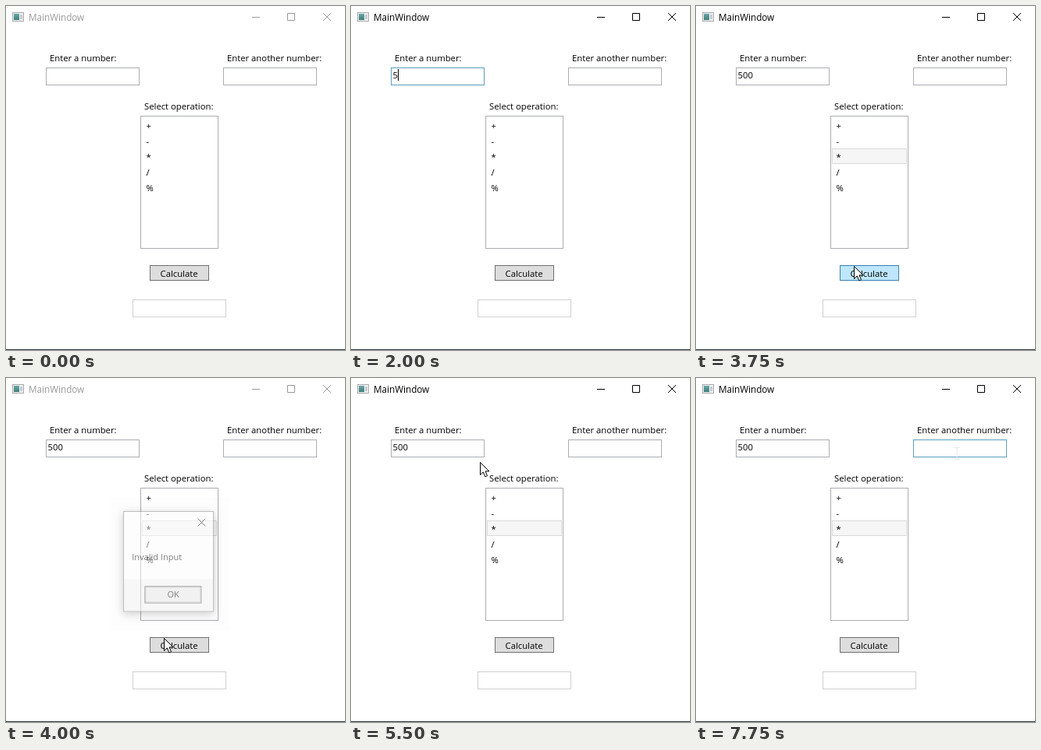
These frames come from a looping animation (434 by 442 pixels, 8000 ms). An HTML page:

```html
<!DOCTYPE html>
<html lang="en">
<head>
<meta charset="utf-8">
<title>Calculator window</title>
<style>
  html, body { margin: 0; width: 100%; height: 100%; overflow: hidden; background: #fff; }
  svg { display: block; width: 434px; height: 442px; }
  text { font: 11.3px "Open Sans", "Noto Sans", sans-serif; fill: #000; white-space: pre; }
  #title { font-size: 11.7px; }
  rect { fill: #fff; stroke: #abadb3; }
  .glyph { fill: none; }
  #caption { stroke: #999; }
  #caption text { fill: #999; stroke: none; }
  #caption.active { stroke: #000; }
  #caption.active text { fill: #000; }
  .hover { stroke: #86b6cc; }
  .focus { stroke: #5b9dbd; }
  #result { stroke: #d0d0d0; }
  #item { fill: none; stroke: none; }
  #item.hover { fill: #e4f4fb; stroke: #70c0e7; }
  #item.chosen { fill: #cbe8f6; stroke: #26a0da; }
  #item.idle { fill: #f6f6f6; stroke: #dadada; }
  #button { fill: #ddd; stroke: #707070; }
  #button.hover { fill: #bee6fd; stroke: #3c7fb1; }
  #halo { fill: #000; fill-opacity: .018; stroke: none; }
  #panel { fill: #fcfcfc; stroke: #777; filter: drop-shadow(0 3px 6px rgba(0, 0, 0, .38)); }
  #footer { fill: #f0f0f0; stroke: none; }
  #caret { stroke: #000; }
</style>
</head>
<body>
<svg viewBox="0 0 434 442">
  <defs>
    <linearGradient id="teal" x2="0" y2="1">
      <stop stop-color="#6aa6a8"/><stop offset="1" stop-color="#3e7f78"/>
    </linearGradient>
  </defs>

  <g id="caption">
    <rect x="8.5" y="8.5" width="14" height="11" style="fill:#f2f2f2;stroke:#a5a9ab"/>
    <rect x="10" y="10" width="7" height="8" style="fill:url(#teal);stroke:none"/>
    <rect x="18" y="11" width="3" height="6" style="fill:#c5cdd0;stroke:none"/>
    <text id="title" x="29" y="19">MainWindow</text>
    <path class="glyph" d="M315 14.5h10M360.5 9.5h9v9h-9zM406 9l10 10M416 9l-10 10"/>
  </g>

  <text x="56" y="71">Enter a number:</text>
  <text x="283" y="71">Enter another number:</text>
  <text x="177" y="133">Select operation:</text>
  <rect id="first" x="51.5" y="79.5" width="119" height="22"/>
  <rect id="second" x="278.5" y="79.5" width="119" height="22"/>
  <text id="typed" x="53.5" y="93"></text>
  <path id="caret"/>

  <rect x="172.5" y="141.5" width="99" height="170"/>
  <rect id="item" x="174.5" y="183.5" width="95" height="19"/>
  <g id="operations"></g>

  <rect id="button" x="184.5" y="333.5" width="75" height="19"/>
  <text x="197.5" y="348">Calculate</text>
  <rect id="result" x="162.5" y="377.5" width="119" height="22"/>
  <path d="M0 441.5h434" stroke="#2c3a3c"/>

  <g id="dialog">
    <rect id="halo" x="132" y="152" width="156" height="176"/>
    <rect id="panel" x="149.5" y="170.5" width="118" height="132"/>
    <rect id="footer" x="150" y="260" width="117" height="42"/>
    <path d="M247 180l10 10M257 180l-10 10" stroke="#000"/>
    <text x="160.5" y="235">Invalid Input</text>
    <rect x="177.5" y="269.5" width="74" height="22" style="fill:#e4e4e4;stroke:#555"/>
    <rect x="178.5" y="270.5" width="72" height="20" style="fill:#e4e4e4;stroke:#999"/>
    <text x="207" y="284">OK</text>
  </g>

  <path id="arrow" d="M.5 .5v16l3.8-3.6 2.5 6 2.7-1.2-2.5-5.8h5z" fill="#fff" stroke="#000"/>
  <path id="beam" class="glyph" d="M-3 -7.5h2.5l.5 .5 .5-.5h2.5M0 -7v14M-3 7.5h2.5l.5-.5 .5 .5h2.5" stroke="#e2e6e8"/>
</svg>

<script>
const LOOP = 8000;
const $ = id => document.getElementById(id);

$("operations").innerHTML = [..."+-*/%"]
  .map((sign, i) => `<text x="179.5" y="${158 + 20 * i}">${sign}</text>`).join("");

const start = {
  active: false, first: "", second: "", typed: "", caret: 0, item: "", button: "",
  dialog: 0, arrow: null, beam: null
};

// Each entry overrides part of the state from its time on.
const timeline = [
  [250, { arrow: [150, 190] }],
  [500, { arrow: null, beam: [115, 98], first: "hover" }],
  [750, { active: true }],
  [1000, { caret: 54, first: "focus" }],
  [1500, { caret: 0 }],
  [2000, { typed: "5", caret: 61, beam: null }],
  [2250, { typed: "50", caret: 68 }],
  [2500, { typed: "500", caret: 74 }],
  [2750, { arrow: [186, 160] }],
  [3000, { arrow: [198, 195], item: "hover", caret: 0 }],
  [3250, { item: "chosen", first: "" }],
  [3500, { arrow: [201, 285] }],
  [3750, { arrow: [202, 334], item: "idle", button: "hover" }],
  [4000, { active: false, button: "", dialog: .5 }],
  [4250, { dialog: 1 }],
  [4500, { arrow: [213, 308] }],
  [4750, { arrow: [224, 281] }],
  [5000, { arrow: [226, 277] }],
  [5250, { dialog: .3, active: true }],
  [5500, { dialog: 0, arrow: [165, 108] }],
  [5750, { arrow: null, beam: [110, 92], first: "hover" }],
  [6250, { first: "focus", caret: 74 }],
  [6500, { beam: [145, 90] }],
  [6750, { beam: null, arrow: [193, 78] }],
  [7000, { arrow: [262, 86] }],
  [7250, { arrow: null, beam: [334, 97], second: "hover", caret: 0 }],
  [7500, { first: "", second: "focus", caret: 281 }],
  [7750, { caret: 0 }]
];

function place(id, point) {
  $(id).style.display = point ? "" : "none";
  if (point) $(id).setAttribute("transform", `translate(${point})`);
}

function showDialog(amount) {
  const dialog = $("dialog");
  dialog.style.display = amount ? "" : "none";
  dialog.setAttribute("opacity", amount);
  dialog.setAttribute("transform", amount < 1
    ? "translate(150 171) scale(.975 .972) translate(-149 -170)" : "");
}

function render(time) {
  const passed = timeline.filter(([at]) => at <= time).map(([, change]) => change);
  const state = Object.assign({}, start, ...passed);
  $("caption").setAttribute("class", state.active ? "active" : "");
  for (const id of ["first", "second", "item", "button"]) $(id).setAttribute("class", state[id]);
  $("typed").textContent = state.typed;
  $("caret").setAttribute("d", state.caret ? `M${state.caret - .5} 81v15` : "");
  showDialog(state.dialog);
  place("arrow", state.arrow);
  place("beam", state.beam);
}

const began = performance.now();
function tick() {
  render((performance.now() - began) % LOOP);
  requestAnimationFrame(tick);
}
tick();
</script>
</body>
</html>
```
